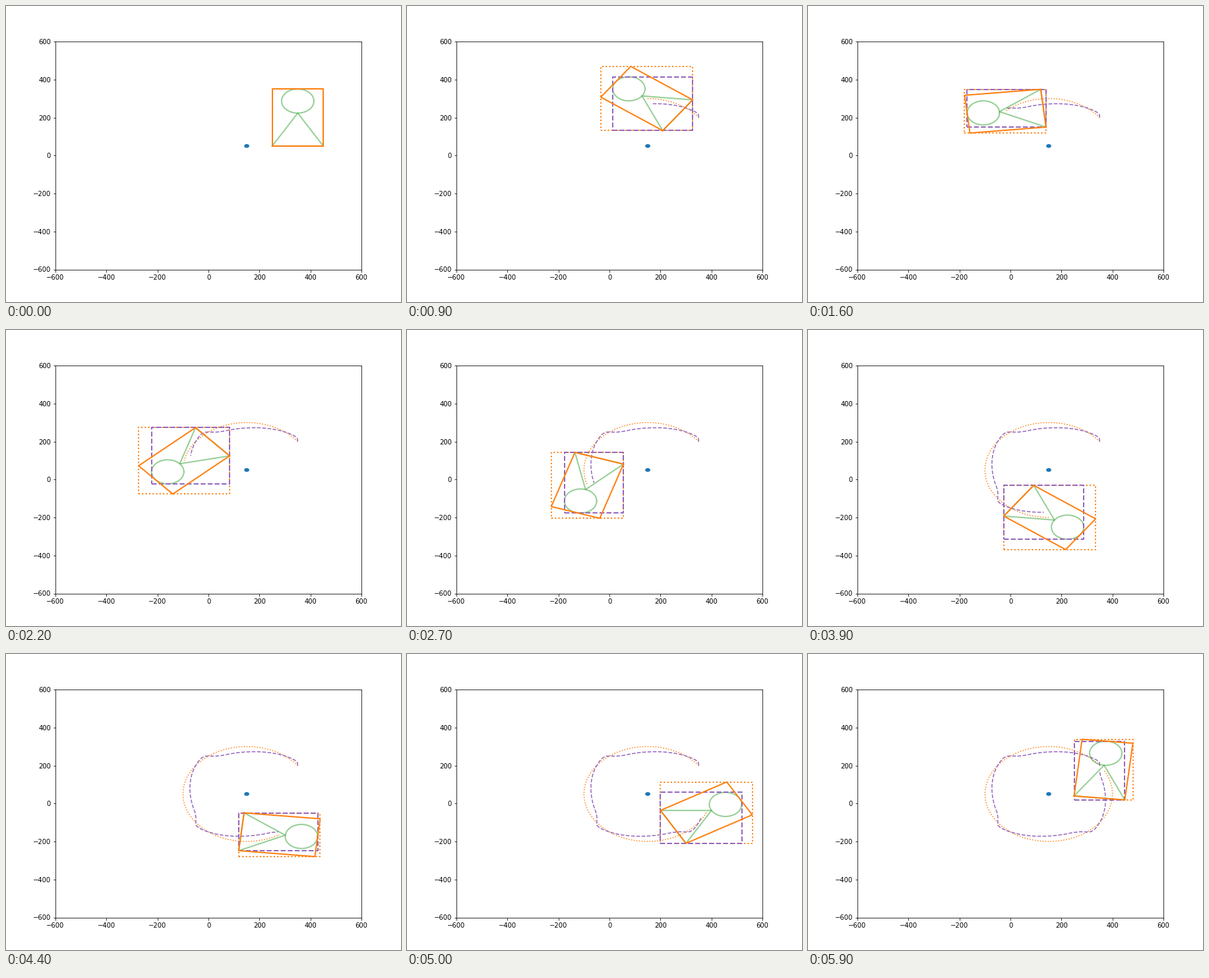
These frames come from a looping animation (599x450 px, 6000 ms). A matplotlib script:

```python
import numpy as np
import matplotlib.pyplot as plt
from matplotlib.animation import FuncAnimation
from matplotlib.patches import Circle

FRAMES = 60
PIVOT = np.array([150.0, 50.0])
X0, Y0, W, H = 250, 50, 200, 300

# Rectangle holding an equilateral triangle with a circle resting on its tip
RECT = np.array([(X0, Y0), (X0 + W, Y0), (X0 + W, Y0 + H), (X0, Y0 + H)])
TIP = Y0 + W * np.sqrt(3) / 2
TRIANGLE = np.array([(X0, Y0), (X0 + W, Y0), (X0 + W / 2, TIP)])
RADIUS = (Y0 + H - TIP) / 2
CENTRE = np.array([[X0 + W / 2, TIP + RADIUS]])
turn = np.linspace(0, 2 * np.pi, 65)
RING = RADIUS * np.column_stack([np.cos(turn), np.sin(turn)])


def rotate(points, angle):
    c, s = np.cos(angle), np.sin(angle)
    return (points - PIVOT) @ np.array([[c, s], [-s, c]]) + PIVOT


def closed(points):
    return np.vstack([points, points[:1]])


def bounds(points):
    return points.min(axis=0), points.max(axis=0)


def box_path(low, high):
    (left, bottom), (right, top) = low, high
    return closed(np.array([(left, bottom), (right, bottom),
                            (right, top), (left, top)]))


def pose(frame):
    """Rotated rectangle, triangle and circle, with the bounds of each group."""
    angle = 2 * np.pi * frame / FRAMES
    rect = rotate(RECT, angle)
    triangle = rotate(TRIANGLE, angle)
    centre = rotate(CENTRE, angle)
    extremes = np.vstack([triangle, centre - RADIUS, centre + RADIUS])
    return rect, triangle, centre + RING, bounds(rect), bounds(extremes)


POSES = [pose(i) for i in range(FRAMES)]
RECT_TRACE = np.array([np.mean(p[3], axis=0) for p in POSES])
SHAPE_TRACE = np.array([np.mean(p[4], axis=0) for p in POSES])

fig, ax = plt.subplots(figsize=(8.32, 6.25), dpi=72)
ax.set_xlim(-600, 600)
ax.set_ylim(-600, 600)
ax.add_patch(Circle(PIVOT, 10, color="tab:blue", lw=0))


def line(color, style="-", width=2, alpha=None):
    return ax.plot([], [], color=color, ls=style, lw=width, alpha=alpha)[0]


rect_trace = line("tab:orange", ":", 1.5)
shape_trace = line("tab:purple", "--", 1.5)
triangle_line = line("tab:green", alpha=0.5)
ring_line = line("tab:green", alpha=0.5)
rect_box = line("tab:orange", ":")
shape_box = line("tab:purple", "--")
rect_line = line("tab:orange")


def update(frame):
    rect, triangle, ring, rect_bounds, shape_bounds = POSES[frame]
    paths = [
        (rect_trace, RECT_TRACE[:frame + 1]),
        (shape_trace, SHAPE_TRACE[:frame + 1]),
        (triangle_line, closed(triangle)),
        (ring_line, ring),
        (rect_box, box_path(*rect_bounds)),
        (shape_box, box_path(*shape_bounds)),
        (rect_line, closed(rect)),
    ]
    for artist, points in paths:
        artist.set_data(points[:, 0], points[:, 1])
    return [artist for artist, _ in paths]


anim = FuncAnimation(fig, update, frames=FRAMES, interval=100,
                     repeat=True, repeat_delay=0)
plt.show()
```
